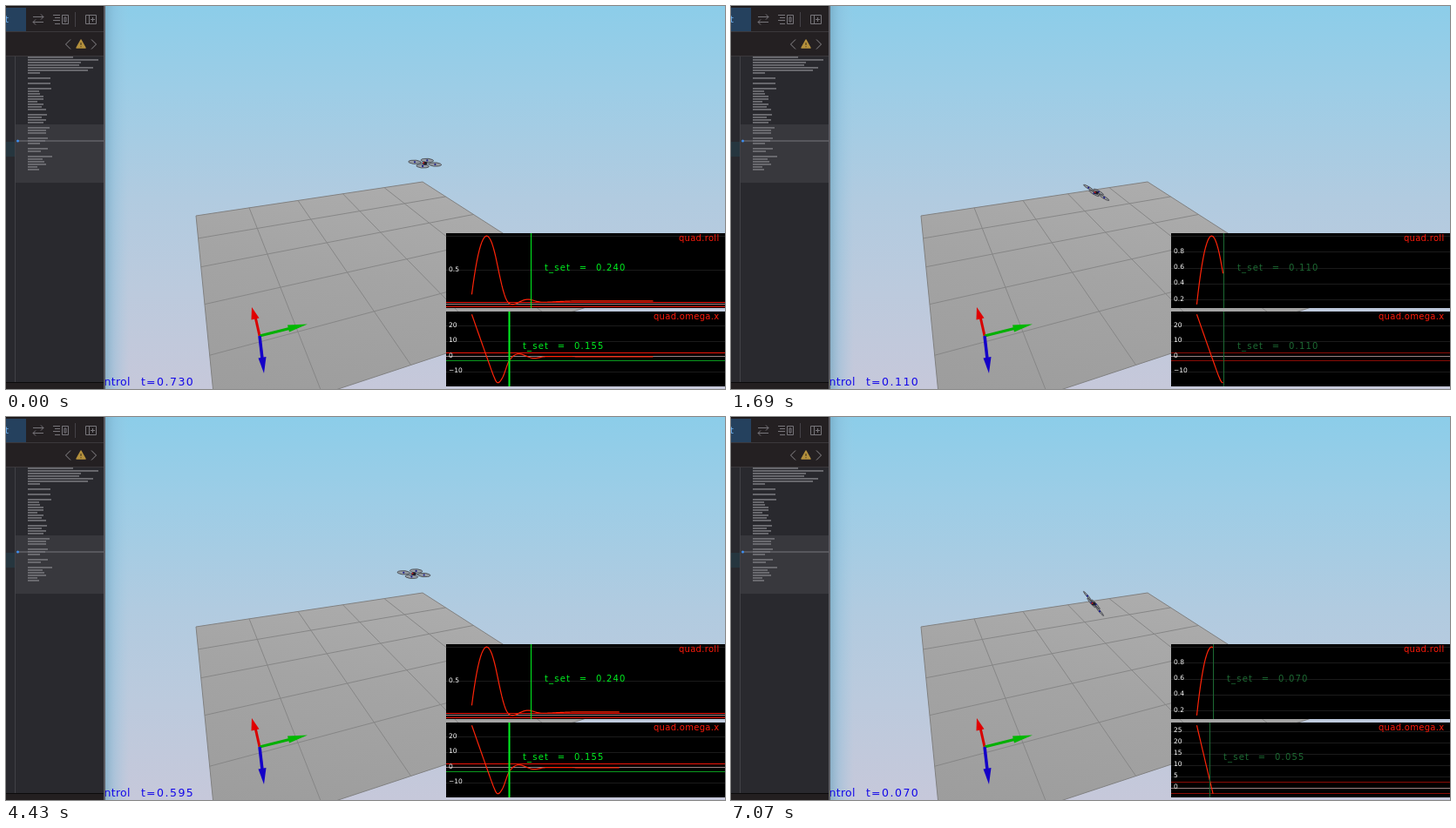
Recreate the animation shown at these times as an HTML page. Size 825 by 440 pixels, loop 7170 ms.

```html
<!DOCTYPE html>
<html lang="en">
<head>
<meta charset="utf-8">
<title>Attitude control</title>
<style>
html, body { margin: 0; width: 825px; height: 440px; overflow: hidden; background: #29292e; }
svg { display: block; }
text { font-family: "DejaVu Sans", sans-serif; white-space: pre; }
.title { font-size: 10px; letter-spacing: .3px; fill: #ff1a0a; text-anchor: end; }
.set { font-size: 10px; letter-spacing: 1.2px; word-spacing: 5.2px; }
.tick { font-size: 7.5px; fill: #fff; }
.clock { font-size: 12.5px; fill: #1408e8; }
</style>
</head>
<body>
<svg id="stage" width="825" height="440" viewBox="0 0 825 440">
  <defs>
    <linearGradient id="sky" x2="0" y2="1">
      <stop offset="0" stop-color="#8ccde9"/>
      <stop offset=".22" stop-color="#9dcde6"/>
      <stop offset=".5" stop-color="#b1cbe0"/>
      <stop offset=".75" stop-color="#bccadd"/>
      <stop offset="1" stop-color="#c6c8da"/>
    </linearGradient>
    <linearGradient id="edge">
      <stop offset="0" stop-color="#6fa3bd" stop-opacity=".7"/>
      <stop offset=".4" stop-color="#86b9d6" stop-opacity=".4"/>
      <stop offset="1" stop-color="#9cc8e0" stop-opacity="0"/>
    </linearGradient>
    <linearGradient id="ground" x1=".6" y1="0" x2=".3" y2="1">
      <stop offset="0" stop-color="#adadad"/>
      <stop offset=".4" stop-color="#a4a4a4"/>
      <stop offset="1" stop-color="#9c9c9c"/>
    </linearGradient>
  </defs>
  <rect width="825" height="440" fill="url(#sky)"/>
  <rect x="113" width="28" height="440" fill="url(#edge)"/>
  <g id="floor"></g>
  <g id="axes">
    <path d="M291 379L286.500 359" stroke="#d80000" stroke-width="3"/>
    <path d="M281.500 360.500L282 346L290.500 358.500Z" fill="#e00000"/>
    <path d="M291 379L325 370.500" stroke="#00b000" stroke-width="3"/>
    <path d="M323 366.500L346 365.500L325 374.500Z" fill="#00b800"/>
    <path d="M291 379L294 405" stroke="#1400c8" stroke-width="3.500"/>
    <path d="M289.500 404.500L296 422L298.500 403Z" fill="#1400c8"/>
  </g>
  <g id="live"></g>
  <g id="editor">
    <rect width="113" height="440" fill="#29292e"/>
    <rect width="113" height="58" fill="#242022"/>
    <rect y="2" width="23" height="27" fill="#25415e"/>
    <path d="M0 .5H113" stroke="#171516"/>
    <path d="M0 29.500H113M0 57.500H113" stroke="#3b383b"/>
    <text x="-1" y="19" font-size="10" fill="#6fb2f5">t</text>
    <g fill="none" stroke="#77757a">
      <path d="M31 12.500H43M40 9.500L43 12.500L40 15.500M43 18.500H31M34 15.500L31 18.500L34 21.500"/>
      <path d="M54 10.500H62M56 13.500H62M54 16.500H62M56 20.500H62M64.500 10.500H71.500V20.500H64.500ZM67 13H69V18H67Z"/>
      <path d="M91.500 10.500H103.500V20.500H91.500ZM95.500 10.500V20.500M97 15.500H102M99.500 13V18"/>
      <path d="M74 38.500L68.500 44L74 49.500M98 38.500L103.500 44L98 49.500" stroke="#8a888c"/>
      <path d="M79.500 7V24" stroke="#454247"/>
    </g>
    <path d="M86 39L91 48H81Z" fill="#b5913d" stroke="#b5913d" stroke-width="1.500" stroke-linejoin="round"/>
    <path d="M86 42V45M86 46.200V47.200" stroke="#3a2e18"/>
    <rect y="156" width="10" height="17" fill="#26363f"/>
    <rect x="11" y="136" width="102" height="67" fill="#38383d"/>
    <path d="M10.500 58V432" stroke="#414146"/>
    <g id="minimap" fill="#6e6e73"></g>
    <path d="M14 155H113" stroke="#77777c"/>
    <circle cx="13.500" cy="155" r="1.500" fill="#3f8ff0"/>
    <rect y="432" width="113" height="8" fill="#231f20"/>
    <path d="M0 432.500H113" stroke="#0c0b0c"/>
    <path d="M113 0V440" stroke="#5c5d64" stroke-width="2"/>
  </g>
</svg>
<script>
const LOOP = 7170, STEP = 57.2, DT = .005;
const $ = id => document.getElementById(id);
const line = (x1, y1, x2, y2, color, width = 1) =>
  `<path d="M${x1} ${y1}L${x2} ${y2}" stroke="${color}" stroke-width="${width}"/>`;

function segment(points, x) {
  let i = 0;
  while (i < points.length - 2 && x >= points[i + 1][0]) i++;
  return i;
}

function linear(points, x) {
  const i = segment(points, x), [x0, y0] = points[i], [x1, y1] = points[i + 1];
  return y0 + (y1 - y0) * (x - x0) / (x1 - x0);
}

// Smooth curve through points, flat beyond both ends
function spline(points) {
  const last = points.length - 1;
  const slope = i => {
    const a = points[Math.max(0, i - 1)], b = points[Math.min(last, i + 1)];
    return (b[1] - a[1]) / (b[0] - a[0]);
  };
  return x => {
    x = Math.min(Math.max(x, points[0][0]), points[last][0]);
    const i = segment(points, x), [x0, y0] = points[i], [x1, y1] = points[i + 1];
    const h = x1 - x0, u = (x - x0) / h, w = 1 - u;
    return w * w * (1 + 2 * u) * y0 + u * u * (3 - 2 * u) * y1
      + h * u * w * (w * slope(i) - u * slope(i + 1));
  };
}

// Simulated seconds at each step; the run restarts twice per loop
const clock = [[-1, .73], [12, .862], [19, .99], [20, .005], [42, .26], [61, .435],
  [116, .99], [117, .005], [123, .07]];

const omega = spline([[.005, 27.71255], [.07, -2.5], [.1, -15.5], [.112, -17], [.13, -13],
  [.155, -2.5], [.19, 1.8], [.25, -1], [.3, .1], [.45, 0]]);

// The roll angle is the spin rate summed over time
const angles = [0, .14541];
for (let i = 2; i <= 200; i++)
  angles[i] = angles[i - 1] + 1.04 * DT * (omega((i - 1) * DT) + omega(i * DT)) / 2;
const roll = t => angles[Math.round(t / DT)];

const flyX = spline([[0, 413.2], [.07, 416], [.26, 433], [.435, 452.5], [1, 506]]);
const flyY = t => Math.min(214.4, 179.7 + 148 * (t - .65) ** 2);

const plots = [
  { name: "quad.roll", top: 261, value: roll, band: .034, lock: .35, pass: .99,
    low: "#f01408", lineWidth: 1,
    settle: t => Math.min(t, .24) },
  { name: "quad.omega.x", top: 351, value: omega, band: 2.5, lock: .21, pass: .905,
    low: "#0a9a1e", lineWidth: 2,
    settle: t => t < .08 ? Math.min(t, .055) : Math.min(t, .155) }
];
const timeX = t => 533 + 287 * t;
const pixel = v => Math.round(v - .5) + .5;

function tickStep(range) {
  const base = 10 ** Math.floor(Math.log10(range * 1.02)), m = range * 1.02 / base;
  return base * (m < 4 ? .5 : m < 8 ? 1 : 2);
}

function drawPlot(p, t) {
  const { top, band } = p, samples = [];
  for (let i = 1; i <= Math.round(t / DT); i++) samples.push([i * DT, p.value(i * DT)]);
  const values = samples.map(s => s[1]);
  let min = Math.min(...values), max = Math.max(...values);
  if (max === min) { min -= .0005; max += .0005; }
  const y = v => top + 3.2 + (max - v) / (max - min) * 78.7;
  const across = (v, color) => line(505, pixel(y(v)), 825, pixel(y(v)), color);

  let out = `<rect x="505" y="${top}" width="320" height="86" fill="#000"/>`;
  const step = tickStep(max - min), digits = Math.max(0, -Math.floor(Math.log10(step)));
  let labels = "";
  for (let i = Math.ceil(min / step); i <= max / step + 1; i++) {
    const v = i * step, at = y(v);
    if (t > DT) out += across(v, "#1b1b1b");
    if (at > top + 6 && at < top + 78)
      labels += `<text class="tick" x="508" y="${at + 1}">${v.toFixed(digits).replace("-", "−")}</text>`;
  }

  const locked = t >= p.lock, passed = t >= p.pass;
  const green = locked ? "#00f020" : "#1d6a33";
  const limit = color => passed ? "#0a5a18" : locked ? color : "#8a0c06";
  if (t > DT) out += across(band, limit("#f01408")) + across(0, "#9a8484") + across(-band, limit(p.low));

  const set = p.settle(t), x = Math.round(timeX(set)) + .5;
  out += `<polyline points="${samples.map(([s, v]) => timeX(s) + "," + y(v)).join(" ")}"
    fill="none" stroke="#ff2408" stroke-width="1.200"/>`;
  out += line(x, top, x, top + 86, green, locked ? p.lineWidth : 1);
  if (passed)
    out += `<rect x="${x}" y="${y(band)}" width="${timeX(t) + 3 - x}" height="${y(-band) - y(band)}"
      fill="none" stroke="#00ff20" stroke-width="2"/>`;
  out += labels + `<text class="set" x="${x + 15.5}" y="${top + 43}" fill="${green}">t_set = ${set.toFixed(3)}</text>`
    + `<text class="title" x="818.500" y="${top + 9}">${p.name}</text>`;
  return `<svg x="505" y="${top}" width="320" height="86" viewBox="505 ${top} 320 86">${out}</svg>`;
}

function drawDrone(t) {
  const k = Math.sin(roll(t)) / .83, mix = (a, b) => a + (b - a) * k;
  const ax = mix(4.7, 2.2), ay = mix(2.2, 3.9), bx = mix(7.3, 4.9), by = mix(-1.3, 4.8);
  const arms = [[-1, -1], [-1, 1], [1, -1], [1, 1]].map(([a, b]) => [a * ax + b * bx, a * ay + b * by]);
  const discs = arms.map(([x, y]) =>
    line(0, 0, x, y, "#333", .8) +
    `<circle r=".85" transform="matrix(${bx} ${by} ${ax} ${ay} ${x} ${y})" fill="#969ba1"
      fill-opacity=".9" stroke="#3c3c40" stroke-width=".8" vector-effect="non-scaling-stroke"/>` +
    `<circle cx="${x}" cy="${y}" r="1.100" fill="#1c1c8c"/>`).join("");
  return `<g transform="translate(${flyX(t)} ${flyY(t)})">${discs}
    <ellipse rx="2.500" ry="2" fill="#1c1c28"/><circle cx="-1.500" cy="-.3" r="1" fill="#c02020"/></g>`;
}

function drawFloor() {
  const [[x0, y0], [x1, y1], [x2, y2], [x3, y3]] = [[218, 241], [478, 202], [690, 338], [242, 486]];
  const dx1 = x1 - x2, dx2 = x3 - x2, sx = x0 - x1 + x2 - x3;
  const dy1 = y1 - y2, dy2 = y3 - y2, sy = y0 - y1 + y2 - y3;
  const den = dx1 * dy2 - dy1 * dx2;
  const g = (sx * dy2 - sy * dx2) / den, h = (dx1 * sy - dy1 * sx) / den;
  const at = (u, v) => {
    const w = 1 + g * u + h * v;
    return [(x0 + (x1 - x0 + g * x1) * u + (x3 - x0 + h * x3) * v) / w,
      (y0 + (y1 - y0 + g * y1) * u + (y3 - y0 + h * y3) * v) / w];
  };
  let out = `<path d="M${x0} ${y0}L${x1} ${y1}L${x2} ${y2}L${x3} ${y3}Z" fill="url(#ground)" stroke="#808080"/>`;
  for (let i = 1; i < 5; i++)
    out += line(...at(i / 5, 0), ...at(i / 5, 1), "#868686") + line(...at(0, i / 5), ...at(1, i / 5), "#868686");
  return out;
}

// A wide header, then blocks that open with a longer line
function drawMinimap() {
  const gaps = [7, 9, 11, 21, 26, 30, 34, 37];
  let seed = 7, out = "";
  const random = () => (seed = seed * 16807 % 2147483647) / 2147483647;
  for (let i = 0; i < 44; i++) {
    const r = random();
    if (gaps.includes(i)) continue;
    const width = i < 6 ? 52 + 32 * r : gaps.includes(i - 1) ? 21 + 7 * r : 10 + 12 * r;
    out += `<rect x="25" y="${58 + 3 * i}" width="${Math.round(width)}" height="1.800"/>`;
  }
  return out;
}

function drawLive(t) {
  return drawDrone(t) + plots.map(p => drawPlot(p, t)).join("") +
    `<text class="clock" y="435.500"><tspan x="112.500" letter-spacing=".3">ntrol</tspan>` +
    `<tspan x="155" letter-spacing="1">t=</tspan>` +
    `<tspan x="173" letter-spacing="1.500">${t.toFixed(3)}</tspan></text>`;
}

$("floor").innerHTML = drawFloor();
$("minimap").innerHTML = drawMinimap();

const start = performance.now();
let shown = null;
function tick() {
  const ms = (performance.now() - start) % LOOP;
  const n = Math.min(123, Math.floor((ms - 15) / STEP));
  if (n !== shown) {
    shown = n;
    $("live").innerHTML = drawLive(Math.round(linear(clock, n) / DT) * DT);
  }
  requestAnimationFrame(tick);
}
tick();
</script>
</body>
</html>
```
